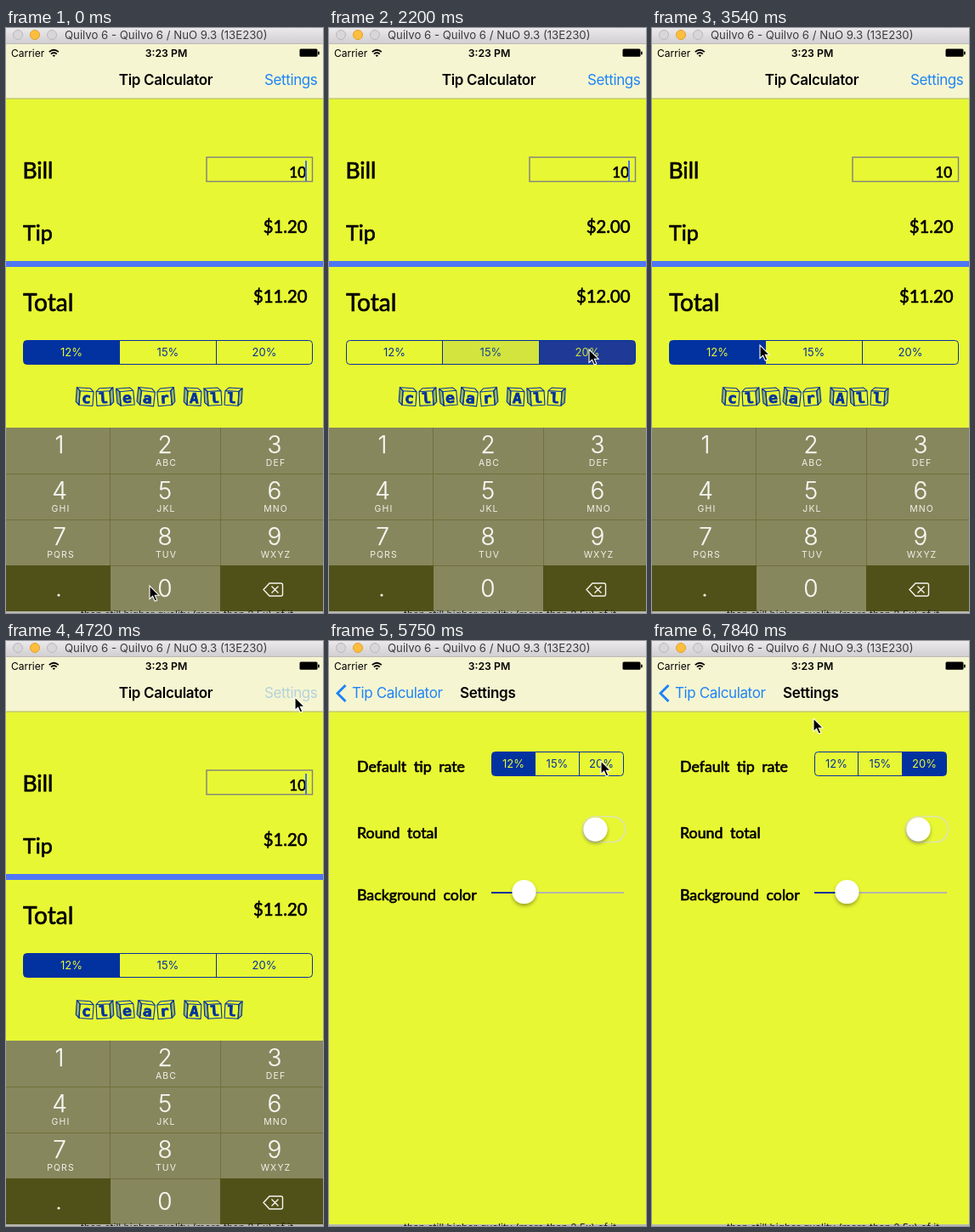
An HTML page that plays this animation: 373x688 px, repeating every 7990 ms.

```html
<!DOCTYPE html>
<html lang="en">
<head>
<meta charset="utf-8">
<title>Tip Calculator</title>
<style>
  html, body { margin: 0; width: 100%; height: 100%; overflow: hidden; background: #e8f733; }
  svg { display: block; width: 373px; height: 688px; }
  text { font-family: Inter, "Open Sans", sans-serif; white-space: pre; }
  .bar { font-size: 17px; letter-spacing: -.38px; }
  .bold { font-weight: 600; letter-spacing: -.3px; }
  .link { fill: #1d84f8; }
  .chalk text { font-family: Lato, sans-serif; stroke: #000; stroke-width: .65px; stroke-linejoin: round; }
  .big { font-size: 26.5px; }
  .money { font-size: 20.3px; text-anchor: end; }
  .option { font-size: 17.8px; word-spacing: 4px; }
  .seg text { font-size: 13px; text-anchor: middle; }
  .cube { fill: none; stroke: #0232a0; stroke-width: 1.1; stroke-linejoin: round; }
  .cube text { font: bold 18px "DejaVu Sans Mono", monospace; fill: #0232a0; stroke-width: .8; text-anchor: middle; }
  .digit { font-size: 28px; font-weight: 300; fill: #f7f7f2; stroke: #f7f7f2; stroke-width: .25; text-anchor: middle; }
  .letters { font-size: 10.5px; letter-spacing: 1.1px; fill: #f1f1ea; text-anchor: middle; }
</style>
</head>
<body>
<svg viewBox="0 0 373 688">
  <defs>
    <linearGradient id="chrome" x2="0" y2="1">
      <stop stop-color="#ebe9eb"/><stop offset="1" stop-color="#d1cfd1"/>
    </linearGradient>
    <linearGradient id="edge">
      <stop stop-opacity="0"/><stop offset="1" stop-opacity=".3"/>
    </linearGradient>
    <filter id="drop" x="-40%" y="-40%" width="180%" height="180%">
      <feDropShadow dx="0" dy="2.5" stdDeviation="2" flood-opacity=".35"/>
    </filter>
  </defs>

  <g id="calculator">
    <rect width="373" height="686" fill="#e8f733"/>
    <g class="chalk">
      <text class="big" x="19.5" y="176.5">Bill</text>
      <text class="big" x="20" y="250" style="font-size:25px">Tip</text>
      <text class="big" x="20" y="333" style="font-size:28px">Total</text>
      <text class="money" x="353" y="176" style="font-size:17px">10</text>
      <text class="money" id="tip" x="354.5" y="241"></text>
      <text class="money" id="total" x="354.5" y="323"></text>
    </g>
    <rect x="236" y="152" width="124.5" height="28.5" fill="none" stroke="#7f8080" stroke-width="1.4"/>
    <rect id="caret" x="352" y="156" width="2" height="24" fill="#4472e8"/>
    <rect y="274" width="373" height="7" fill="#5077f2"/>
    <g id="rates"></g>
    <g id="clear"></g>
    <g id="keypad"></g>
  </g>

  <rect id="dim" y="84" width="373" height="602" opacity=".1"/>
  <g id="settings">
    <rect x="-8" y="84" width="8" height="602" fill="url(#edge)"/>
    <rect width="373" height="686" fill="#e8f733"/>
    <g class="chalk">
      <text class="option" x="33" y="154">Default tip rate</text>
      <text class="option" x="33" y="232">Round total</text>
      <text class="option" x="33" y="305">Background color</text>
    </g>
    <g id="defaults"></g>
    <rect x="298.5" y="206.5" width="50" height="30" rx="15" fill="none" stroke="#dfe3b4" stroke-width="1.6"/>
    <path d="M191 296H347" stroke="#b4b5ad" stroke-width="2"/>
    <path d="M191 296H229" stroke="#0232a0" stroke-width="2"/>
    <g fill="#fff" filter="url(#drop)">
      <circle cx="313.5" cy="221.5" r="14"/>
      <circle cx="229.5" cy="295" r="14"/>
    </g>
  </g>

  <rect y="18" width="373" height="64.7" fill="#f6f5d1"/>
  <rect y="82.6" width="373" height=".9" fill="#abac86"/>
  <g id="calculatorNav">
    <text class="bar bold" x="188" y="67" text-anchor="middle">Tip Calculator</text>
    <text class="bar link" id="settingsLink" x="304" y="67">Settings</text>
  </g>
  <g id="settingsNav">
    <path d="M19.5 52 10 61.5 19.5 71" fill="none" stroke="#1d84f8" stroke-width="3"/>
    <text class="bar link" id="back" x="27" y="67">Tip Calculator</text>
    <text class="bar bold" id="settingsTitle" x="154" y="67">Settings</text>
  </g>

  <text x="6" y="33.5" font-size="12">Carrier</text>
  <g fill="none" stroke="#000" stroke-width="1.8">
    <path d="M50.8 28.2Q56.3 23.2 61.8 28.2M52.9 30.6Q56.3 27.4 59.7 30.6"/>
    <path d="M56.3 34 54.6 32.2Q56.3 30.8 58 32.2Z" fill="#000" stroke="none"/>
  </g>
  <text x="188.5" y="33.5" font-size="12.3" font-weight="600" text-anchor="middle">3:23 PM</text>
  <rect x="345.5" y="24.6" width="21" height="9.2" rx="1.5"/>
  <rect x="367" y="27.5" width="1.7" height="4" rx=".8"/>

  <rect width="373" height="18" fill="url(#chrome)"/>
  <rect y="18" width="373" height="1" fill="#bdbbb4"/>
  <g fill="#d8d6d8" stroke="#b9b7b9">
    <circle cx="14" cy="8" r="5.5"/>
    <circle cx="34" cy="8" r="5.5" fill="#fdbe3d" stroke="#e0a032"/>
    <circle cx="54" cy="8" r="5.5"/>
  </g>
  <text x="69" y="13" font-size="13.2" fill="#3d3b3d">Quilvo 6 - Quilvo 6 / NuO 9.3 (13E230)</text>

  <rect y="686" width="373" height="2" fill="#b8b8b0"/>
  <text x="88" y="694" font-size="12" fill="#222">than still higher quality (more than 2.5x) of it</text>

  <path id="pointer" d="M0 0V15.5L3.6 12.2 6.2 18 8.8 16.9 6.3 11.2H11Z" stroke="#fff" stroke-width="1.1"/>
</svg>
<script>
const $ = id => document.getElementById(id);
const LOOP = 7990, TICK = 147.6;
const BLUE = [2, 50, 160], YELLOW = [232, 247, 51], PRESSED = [232, 120, 75];
const RATES = [12, 15, 20];
const mix = (from, to, p) => `rgb(${from.map((c, k) => c + (to[k] - c) * p)})`;

function buildSegments(id, edges, top) {
  const [left, , , right] = edges;
  let html = `<clipPath id="${id}Clip"><rect x="${left}" y="${top}" width="${right - left}" height="28" rx="4"/></clipPath>`;
  RATES.forEach((rate, i) => {
    const x = edges[i], w = edges[i + 1] - x;
    html += `<rect class="cell" x="${x}" y="${top}" width="${w}" height="28" clip-path="url(#${id}Clip)"/>
      <text x="${x + w / 2}" y="${top + 18.5}">${rate}%</text>`;
  });
  html += `<path d="M${edges[1]} ${top}v28M${edges[2]} ${top}v28" stroke="#0232a0"/>
    <rect x="${left}" y="${top}" width="${right - left}" height="28" rx="4" fill="none" stroke="#0232a0"/>`;
  $(id).innerHTML = `<g class="seg">${html}</g>`;
}

function buildCubes() {
  const tilts = [4, -3, -5, 6, -5, 3, -3, 3];
  $('clear').innerHTML = [...'clearAll'].map((letter, i) => {
    const x = 82 + i * 24 + (i > 4 ? 7 : 0), side = i % 3 == 1 ? -1 : 1;
    return `<g class="cube" transform="translate(${x + 10.5} 435.5) rotate(${tilts[i]}) scale(${side} .93)">
      <path d="M-6-9H10V9H-6ZM-6-9-10-13H6L10-9"/>
      <path d="M-6-9-10-13V5L-6 9Z" fill="#0232a0" fill-opacity=".35"/>
      <text x="${2 * side}" y="6" transform="scale(${side} 1)">${letter}</text></g>`;
  }).join('');
}

function buildKeypad() {
  const letters = ['', 'ABC', 'DEF', 'GHI', 'JKL', 'MNO', 'PQRS', 'TUV', 'WXYZ'];
  const centers = [63, 187, 316];
  let html = `<rect y="470" width="373" height="216" fill="#86875d"/>
    <path d="M0 524.5H373M0 578.5H373M0 632.5H373M122.5 470V686M252.5 470V686" stroke="#70713a"/>
    <path d="M0 632H123V686H0ZM252 632H373V686H252Z" fill="#505118"/>`;
  letters.forEach((label, i) => {
    const x = centers[i % 3], y = 500 + 54 * Math.floor(i / 3);
    html += `<text class="digit" x="${x}" y="${y}">${i + 1}</text>
      <text class="letters" x="${x + 1.5}" y="${y + 15}">${label}</text>`;
  });
  $('keypad').innerHTML = html + `<text class="digit" x="187" y="669">0</text>
    <circle cx="62" cy="667" r="1.6" fill="#f7f7f2"/>
    <path d="M303 660.5 310 653H323.5Q325.5 653 325.5 655V666Q325.5 668 323.5 668H310ZM312.5 656.5l8 8m0-8l-8 8"
      fill="none" stroke="#f4f4ee" stroke-width="1.4"/>`;
}

// Each pick is [time, selected index, strength of the brief fade].
const ratePicks = [[-LOOP, 0, 0], [1030, 1, .2], [2200, 2, .12], [3240, 0, .2]];
const defaultPicks = [[-LOOP, 0, 0], [7400, 2, .2]];

function paintSegments(id, picks, t) {
  const now = picks.findLastIndex(p => p[0] <= t);
  const [start, chosen, strength] = picks[now];
  const fade = t - start < 140 ? strength : 0;
  const cells = $(id).querySelectorAll('.cell'), labels = $(id).querySelectorAll('text');
  RATES.forEach((_, i) => {
    const on = i == chosen, leaving = now && i == picks[now - 1][1];
    const level = on ? 1 - fade : leaving ? fade * .8 : 0;
    cells[i].setAttribute('fill', mix(BLUE, PRESSED, on ? fade : 0));
    cells[i].setAttribute('opacity', on ? 1 : level);
    labels[i].setAttribute('fill', mix(BLUE, YELLOW, level));
  });
  return RATES[chosen];
}

// Each move is [start, end, x, y].
const moves = [
  [0, 880, 215, 384], [1320, 1470, 222, 384], [1610, 2050, 306, 378],
  [2350, 2790, 127, 373], [3540, 4420, 340, 66], [5010, 5750, 320, 141], [7700, 7800, 190, 91]
];

function pointerAt(t) {
  const time = Math.floor((t + 12) / TICK) * TICK;
  let x = 169, y = 656;
  for (const [start, end, toX, toY] of moves) {
    const p = Math.min(1, Math.max(0, (time - start) / (end - start)));
    const ease = p * p * (3 - 2 * p);
    x += (toX - x) * ease;
    y += (toY - y) * ease;
  }
  return [x, y];
}

const show = (id, on) => $(id).setAttribute('visibility', on ? 'visible' : 'hidden');
const shift = (id, x, y = 0) => $(id).setAttribute('transform', `translate(${x} ${y})`);

function draw(clock) {
  const t = clock % LOOP;
  const rate = paintSegments('rates', ratePicks, t);
  paintSegments('defaults', defaultPicks, t);
  $('tip').textContent = '$' + (rate / 10).toFixed(2);
  $('total').textContent = '$' + (10 + rate / 10).toFixed(2);
  $('caret').setAttribute('opacity', (t + 735) % 1030 < 300 && t > 290 ? 0 : 1);
  $('settingsLink').setAttribute('opacity', t >= 4720 ? .3 : 1);

  const pushed = t >= 5010;
  const slide = t < 5160 ? 11 : t < 5300 ? 2 : 0;
  for (const id of ['settings', 'settingsNav', 'dim']) show(id, pushed);
  show('calculatorNav', !pushed);
  shift('calculator', pushed ? -.3 * (373 - slide) : 0);
  shift('settings', slide);
  shift('back', slide * .13);
  shift('settingsTitle', slide * .28);
  $('settingsNav').firstElementChild.setAttribute('opacity', 1 - slide * .04);
  $('back').setAttribute('opacity', 1 - slide * .04);
  shift('pointer', ...pointerAt(t));
  requestAnimationFrame(() => draw(performance.now()));
}

buildSegments('rates', [20.5, 133.5, 247.5, 360.5], 367.5);
buildSegments('defaults', [191.5, 242.5, 294.5, 346.5], 130.5);
buildCubes();
buildKeypad();
draw(0);
</script>
</body>
</html>
```
